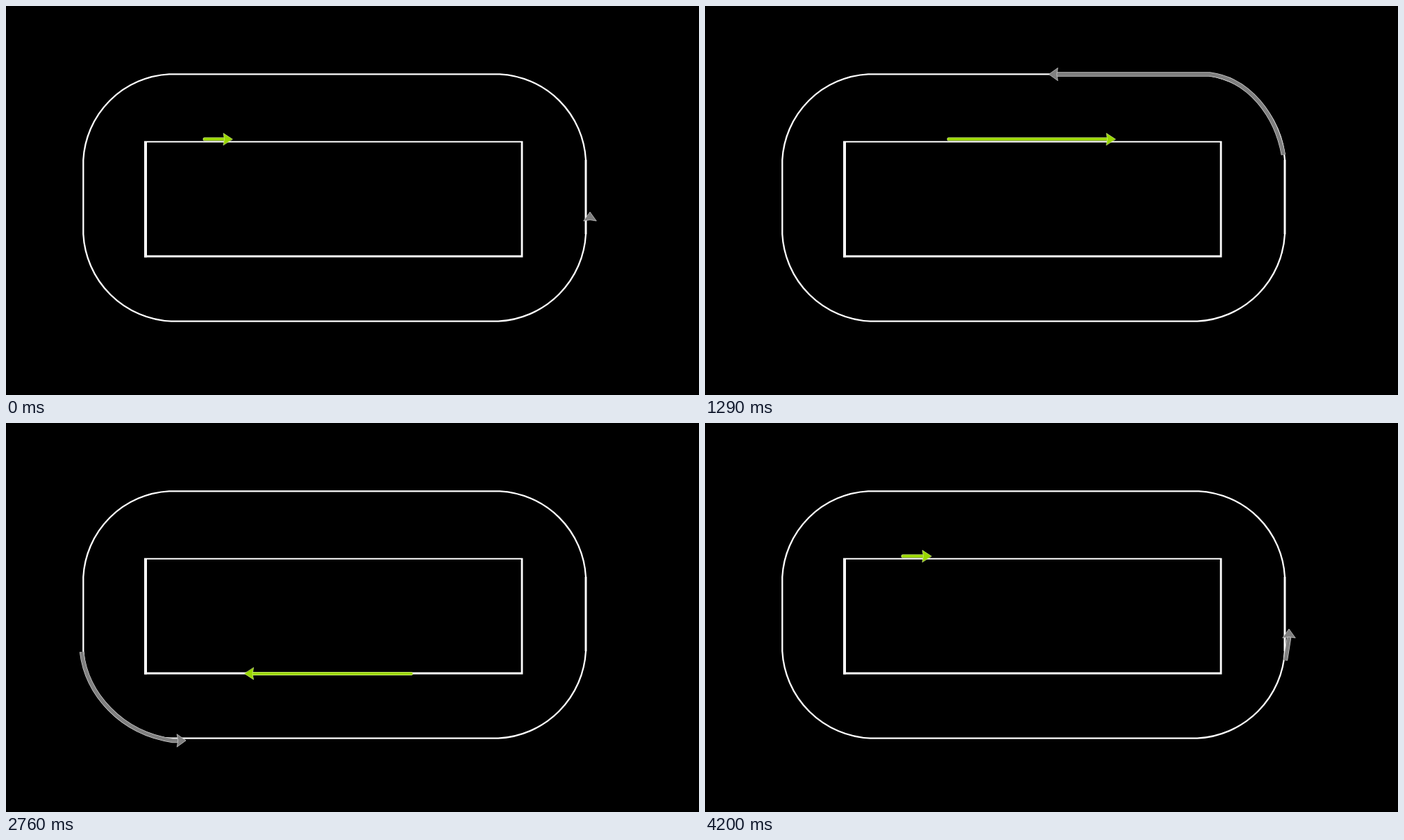
These frames come from a looping animation (998x561 px, 4500 ms). An HTML page:

```html
<!DOCTYPE html>
<html lang="en">
<head>
<meta charset="utf-8">
<title>Counter-rotating loops</title>
<style>
html, body { margin: 0; width: 100%; height: 100%; overflow: hidden; background: #000; }
svg { display: block; width: 998px; height: 561px; }
path { fill: none; }
.walls { stroke: #fff; }
.grey { --fill: #808080; --edge: #d6d6d6; --wide: 6.4; --thin: 5; }
.green { --fill: #99d600; --edge: #d2f088; --wide: 5; --thin: 3.6; stroke-linecap: round; }
.edge { stroke: var(--edge); stroke-width: var(--wide); }
.core { stroke: var(--fill); stroke-width: var(--thin); }
polygon { fill: var(--fill); stroke: var(--edge); stroke-width: .7; }
</style>
</head>
<body>
<svg id="stage" viewBox="0 0 998 561">
  <g class="walls">
    <path stroke-width="2.3" d="M235 98.3H711A131 131 0 0 1 835 222V329A133 133 0 0 1 709 454.7H238A133 133 0 0 1 111.3 329V222A131 131 0 0 1 235 98.3Z"/>
    <path stroke-width="2.8" d="M835 222V329"/>
    <path stroke-width="2" d="M199 195.7H744"/>
    <path stroke-width="2.8" d="M743 195V361H199"/>
    <path stroke-width="4" d="M201 195V362.4"/>
  </g>
</svg>
<script>
const LOOP = 4500, STEP = 30;
const stage = document.getElementById('stage');

function add(parent, tag, attrs) {
  const el = document.createElementNS('http://www.w3.org/2000/svg', tag);
  for (const name in attrs) el.setAttribute(name, attrs[name]);
  return parent.appendChild(el);
}

// Smooth curve through [time, distance] keys, held at both ends.
function ease(keys, t) {
  const last = keys.length - 1;
  if (t <= keys[0][0]) return keys[0][1];
  if (t >= keys[last][0]) return keys[last][1];
  const i = keys.findIndex(k => k[0] > t) - 1;
  const slope = j => {
    const a = keys[Math.max(j - 1, 0)], b = keys[Math.min(j + 1, last)];
    return (b[1] - a[1]) / (b[0] - a[0]);
  };
  const [t0, d0] = keys[i], [t1, d1] = keys[i + 1];
  const span = t1 - t0, u = (t - t0) / span, v = 1 - u;
  return d0 * v * v * (1 + 2 * u) + d1 * u * u * (3 - 2 * u)
    + span * u * v * (slope(i) * v - slope(i + 1) * u);
}

// The tip follows the keys and stops at `end`; the tail trails by `trail`.
function arrow(cls, d, { keys, trail, start = 0, end, from = 0, to = LOOP, half }) {
  const group = add(stage, 'g', { class: cls });
  const lines = ['edge', 'core'].map(name => add(group, 'path', { class: name, d }));
  const head = add(group, 'polygon', { points: `0,0 -13,${-half} -11.5,0 -13,${half}` });
  const path = lines[1];
  const stop = end || path.getTotalLength();
  return t => {
    const shown = t >= from && t < to;
    group.style.display = shown ? '' : 'none';
    if (!shown) return;
    const run = ease(keys, t);
    const tip = Math.min(run, stop), tail = Math.max(start, run - trail);
    const length = tip - 10 - tail;
    for (const line of lines) {
      line.style.display = length > 0 ? '' : 'none';
      line.setAttribute('stroke-dasharray', `${Math.max(length, 0)} 9999`);
      line.setAttribute('stroke-dashoffset', -tail);
    }
    const p = path.getPointAtLength(tip), q = path.getPointAtLength(tip - 6);
    const angle = Math.atan2(p.y - q.y, p.x - q.x) * 180 / Math.PI;
    head.setAttribute('transform', `translate(${p.x} ${p.y}) rotate(${angle})`);
  };
}

const arrows = [
  arrow('grey',
    'M841 307V279C841 255 838 235 833 215C823 159 785 106 727 98.5H222C165 104 129 153 112 208L111 222C106 250 103 300 106 343',
    { keys: [[600, 10], [630, 28], [1290, 493], [1860, 949], [2220, 1225], [2460, 1408]],
      trail: 400, to: 2460, half: 9.3 }),
  arrow('grey',
    'M109 330C116 390 165 447 240 458L725 456C772 450 821 403 835 348L841 310V297',
    { keys: [[2460, 13], [2760, 216], [3300, 587.5], [3480, 710.5], [4200, 1250]],
      trail: 400, from: 2460, half: 9.3 }),
  arrow('green', 'M201 192H742V361.5H200L201 192H342',
    { keys: [[600, 125], [1290, 390], [1860, 630], [2760, 1109], [3300, 1395], [3480, 1483], [4200, 1746]],
      trail: 240, start: 85, end: 1547, half: 8.5 })
];

function draw(now) {
  const t = Math.floor(now % LOOP / STEP) * STEP;
  arrows.forEach(update => update(t));
  requestAnimationFrame(draw);
}
draw(performance.now());
</script>
</body>
</html>
```
